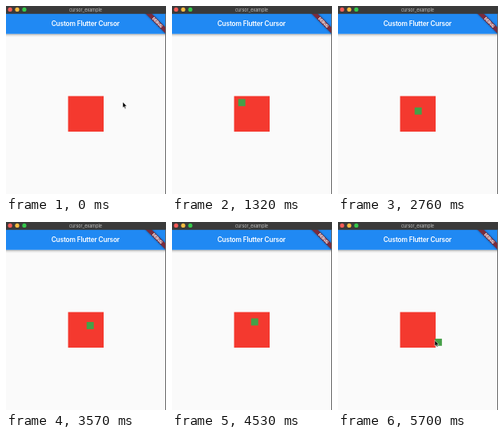
Recreate the animation shown at these times as an HTML page. Size 200 by 235 pixels, loop 5.73 s.

```html
<!DOCTYPE html>
<html lang="en">
<head>
<meta charset="utf-8">
<title>cursor_example</title>
<style>
  html, body { margin: 0; width: 100%; height: 100%; overflow: hidden; background: #fafafa; }
  svg { display: block; }
  text { text-anchor: middle; font-family: Inter, sans-serif; }
  .title { font-size: 8.3px; font-weight: 600; letter-spacing: -.02em; fill: #fff; }
  .window { font-size: 5.5px; fill: #c4c4c4; }
  .debug { font: 900 5px Roboto, sans-serif; fill: #fff; }
</style>
</head>
<body>
<svg width="200" height="235">
  <defs>
    <linearGradient id="shade" x2="0" y2="1">
      <stop offset="0" stop-opacity=".32"/>
      <stop offset=".4" stop-opacity=".12"/>
      <stop offset="1" stop-opacity="0"/>
    </linearGradient>
    <filter id="blur" x="-20%" y="-100%" width="140%" height="300%"><feGaussianBlur stdDeviation=".9"/></filter>
  </defs>

  <rect width="200" height="235" fill="#fafafa"/>
  <rect y="34.8" width="200" height="4" fill="url(#shade)"/>
  <rect y="9" width="200" height="25.8" fill="#2089f3"/>
  <text class="title" x="99.3" y="24.6">Custom Flutter Cursor</text>

  <g transform="translate(200 9.8) rotate(45)">
    <rect x="-20" y="12.5" width="40" height="5.3" opacity=".5" filter="url(#blur)"/>
    <rect x="-20" y="12.5" width="40" height="5.3" fill="#792c3e"/>
    <text class="debug" y="16.9">DEBUG</text>
  </g>

  <rect width="200" height="9.8" fill="#3a3a3a"/>
  <circle cx="5.1" cy="4.4" r="2.6" fill="#fc5b57"/>
  <circle cx="14" cy="4.4" r="2.6" fill="#fdbc40"/>
  <circle cx="22.9" cy="4.4" r="2.6" fill="#34c84a"/>
  <text class="window" x="99.5" y="6.5">cursor_example</text>
  <rect x="199" y="9.8" width="1" height="226" fill="#666"/>

  <rect x="77.6" y="112.6" width="44.5" height="44.5" fill="#f4392f"/>
  <rect id="box" width="8.9" height="8.9" fill="#45a048"/>
  <path id="arrow" d="M0 2v7.2l1.6-1.4 1.2 2.6 1.1-.5-1.1-2.6H5z" stroke="#fff" stroke-width=".5"/>
</svg>
<script>
const LOOP = 5730;
const box = document.getElementById('box');
const arrow = document.getElementById('arrow');

// Turning points of the pointer: time, x, y
const stops = [
  [0, 146, 118], [1320, 82.8, 116.3], [2760, 95.8, 126.8], [3180, 103, 165],
  [3570, 100.8, 125], [4140, 104, 108], [5010, 91.8, 137.6], [LOOP, 121.1, 145.9]
];

function pointer(t) {
  const i = stops.findIndex(s => s[0] > t);
  const [t0, x0, y0] = stops[i - 1], [t1, x1, y1] = stops[i];
  const ease = (1 - Math.cos(Math.PI * (t - t0) / (t1 - t0))) / 2;
  return [x0 + (x1 - x0) * ease, y0 + (y1 - y0) * ease];
}

function show(node, visible, x, y) {
  node.setAttribute('visibility', visible ? 'visible' : 'hidden');
  node.setAttribute('transform', `translate(${x} ${y})`);
}

// The box follows inside the square, the arrow outside; both show at its right edge
function draw(t) {
  const [x, y] = pointer(t);
  const below = y > 157, above = y < 112;
  show(box, x < 123 && !below && !above, x, y);
  show(arrow, x > 120.5 || below, x, y);
}

const start = performance.now();
function frame() {
  draw((performance.now() - start) % LOOP);
  requestAnimationFrame(frame);
}
frame();
</script>
</body>
</html>
```
